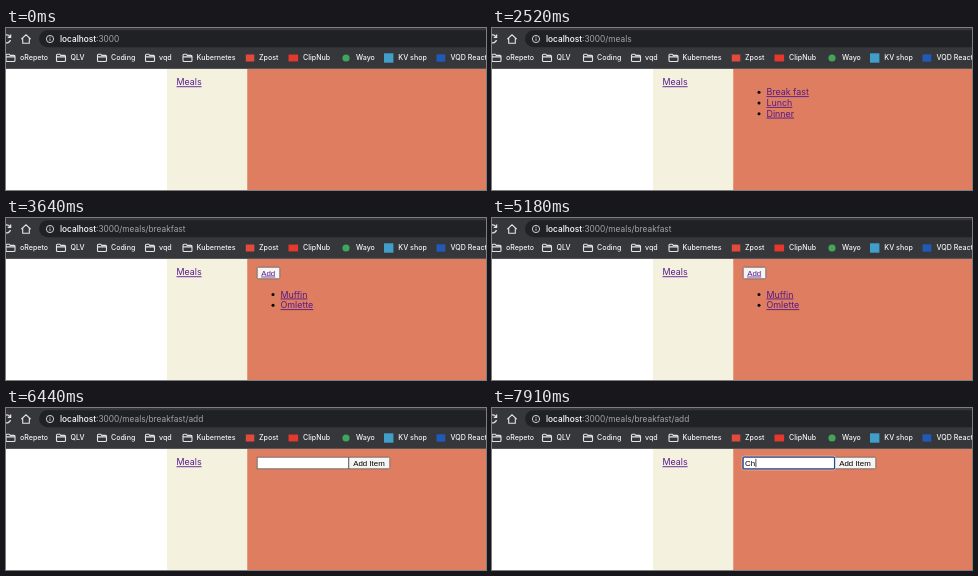
Write an HTML page that moves like this. It is 480 by 162 pixels and loops after 8000 ms.

```html
<!DOCTYPE html>
<html lang="en">
<head>
<meta charset="utf-8">
<title>Meals</title>
<style>
  html, body { margin: 0; width: 100%; height: 100%; overflow: hidden; background: #fff; }
  svg { display: block; width: 480px; height: 162px; }
  text { white-space: pre; }

  .url { font: 8.3px Inter, sans-serif; fill: #a3a6aa; }
  .url .host { font-weight: 500; fill: #fff; }
  .bookmarks { font: 500 7.1px Inter, sans-serif; fill: #f4f5f6; }
  .icon { fill: none; stroke: #e2e3e5; stroke-width: 1.1; }
  .link { font: 8.9px Inter, sans-serif; fill: #551a8b; text-decoration: underline; }
  .control { font: 7.9px "Liberation Sans", Arial, sans-serif; fill: #000; }
  .control .link { font: inherit; }
  .box { fill: #fff; stroke: #626262; stroke-width: .8; }
  .button { fill: #f6f4f3; }

  /* Every part shares one 8 s clock and switches without easing. */
  .timed { animation: 8s step-end infinite; visibility: hidden; }
  .meals { animation-name: meals; }
  .meals-on { animation-name: meals-on; }
  .breakfast { animation-name: breakfast; }
  .breakfast-on { animation-name: breakfast-on; }
  .add-on { animation-name: add-on; }
  .focus { animation-name: focus; }
  .first { animation-name: first; }
  .second { animation-name: second; }
  .caret { animation-name: caret; }

  @keyframes meals { 0% { visibility: hidden } 23.625% { visibility: visible } 43.75%, 100% { visibility: hidden } }
  @keyframes meals-on { 0% { visibility: hidden } 23.625%, 100% { visibility: visible } }
  @keyframes breakfast { 0% { visibility: hidden } 43.75% { visibility: visible } 69.125%, 100% { visibility: hidden } }
  @keyframes breakfast-on { 0% { visibility: hidden } 43.75%, 100% { visibility: visible } }
  @keyframes add-on { 0% { visibility: hidden } 69.125%, 100% { visibility: visible } }
  @keyframes focus { 0% { visibility: hidden } 85.75%, 100% { visibility: visible } }
  @keyframes first { 0% { visibility: hidden } 96.25%, 100% { visibility: visible } }
  @keyframes second { 0% { visibility: hidden } 98%, 100% { visibility: visible } }
  @keyframes caret {
    0% { visibility: hidden; transform: none }
    85.75% { visibility: visible; transform: none }
    92% { visibility: hidden; transform: none }
    96.25% { visibility: visible; transform: translateX(5.7px) }
    98%, 100% { visibility: visible; transform: translateX(10.4px) }
  }
</style>
</head>
<body>
<svg viewBox="0 0 480 162">
  <defs>
    <g id="folder" class="icon">
      <path d="M.5 1.5q0-1 1-1h2.2l1.1 1.2h3.7q1 0 1 1v4.1q0 1-1 1h-7q-1 0-1-1zM.5 3.2h9"/>
    </g>
  </defs>

  <!-- Page columns -->
  <rect width="480" height="162" fill="#fff"/>
  <rect x="161" y="41" width="81" height="121" fill="#f4f2df"/>
  <rect x="241.25" y="41" width="239" height="121" fill="#de7d5f"/>
  <text class="link" x="170.5" y="57.3">Meals</text>

  <!-- Toolbar -->
  <rect width="480" height="41" fill="#36373b"/>
  <rect y="40" width="480" height="1" fill="#55565a"/>
  <rect x="33" y="2.3" width="480" height="17" rx="8.5" fill="#202124"/>
  <g class="icon">
    <path d="M3.8 8.4A4 4 0 1 0 4.5 12M4.6 6.6v2.8H1.8" stroke-width="1.3"/>
    <path d="M15.3 11.2 20 6.8l4.7 4.4M16.7 10.2v5h6.6v-5"/>
    <circle cx="44" cy="11" r="3.6" stroke-width=".9"/>
    <path d="M44 10.5v2.3M44 8.8v.9" stroke-width=".9"/>
  </g>
  <text class="url" x="54" y="13.8"><tspan class="host">localhost</tspan>:3000<tspan class="timed meals-on">/meals</tspan><tspan class="timed breakfast-on">/breakfast</tspan><tspan class="timed add-on">/add</tspan></text>

  <!-- Bookmarks -->
  <use href="#folder" x="-.5" y="25.7"/>
  <use href="#folder" x="50" y="25.7"/>
  <use href="#folder" x="91" y="25.7"/>
  <use href="#folder" x="139" y="25.7"/>
  <use href="#folder" x="176.5" y="25.7"/>
  <rect x="239.8" y="26.5" width="8.5" height="7" fill="#e34a3d"/>
  <rect x="282.5" y="26.6" width="9.6" height="6.8" fill="#e8372c"/>
  <circle cx="340" cy="30" r="3.6" fill="#3fa65a"/>
  <rect x="378" y="25.3" width="9.4" height="9.4" fill="#3f9fc8"/>
  <rect x="430.5" y="26.3" width="8.8" height="7.4" fill="#2159b4"/>
  <g class="bookmarks">
    <text x="14" y="32.4">oRepeto</text>
    <text x="64.5" y="32.4">QLV</text>
    <text x="105" y="32.4">Coding</text>
    <text x="153" y="32.4">vqd</text>
    <text x="190.5" y="32.4">Kubernetes</text>
    <text x="253" y="32.4">Zpost</text>
    <text x="297" y="32.4">ClipNub</text>
    <text x="350" y="32.4">Wayo</text>
    <text x="392.3" y="32.4">KV shop</text>
    <text x="444.5" y="32.4">VQD React</text>
  </g>

  <!-- Meal list -->
  <g class="timed meals">
    <circle cx="267" cy="64.3" r="1.5"/>
    <circle cx="267" cy="75" r="1.5"/>
    <circle cx="267" cy="85.7" r="1.5"/>
    <text class="link" x="274.5" y="67.2">Break fast</text>
    <text class="link" x="274.5" y="77.9">Lunch</text>
    <text class="link" x="274.5" y="88.6">Dinner</text>
  </g>

  <!-- Breakfast list -->
  <g class="timed breakfast">
    <rect class="box button" x="251.2" y="49.2" width="22.6" height="11.6" rx="1.2"/>
    <g class="control"><text class="link" x="255.2" y="57.6">Add</text></g>
    <circle cx="267" cy="76.5" r="1.5"/>
    <circle cx="267" cy="87.2" r="1.5"/>
    <text class="link" x="274.5" y="79.5">Muffin</text>
    <text class="link" x="274.5" y="90.2">Omlette</text>
  </g>

  <!-- Add form -->
  <g class="timed add-on control">
    <rect class="box" x="251.2" y="49.2" width="91.2" height="11.6"/>
    <rect class="box button" x="342.8" y="49.2" width="41" height="11.6" rx="1.2"/>
    <text x="347.2" y="57.6">Add Item</text>
  </g>
  <g class="timed focus" fill="none">
    <rect x="250.1" y="48.2" width="93.2" height="13.6" rx="1.8" stroke="#e9e6ee" stroke-width=".7"/>
    <rect x="250.9" y="49" width="91.6" height="12" rx="1" stroke="#24479f" stroke-width="1.1"/>
  </g>
  <text class="control" x="253" y="57.6"><tspan class="timed first">C</tspan><tspan class="timed second">h</tspan></text>
  <rect class="timed caret" x="253" y="50.8" width=".7" height="8.4"/>
</svg>
</body>
</html>
```
